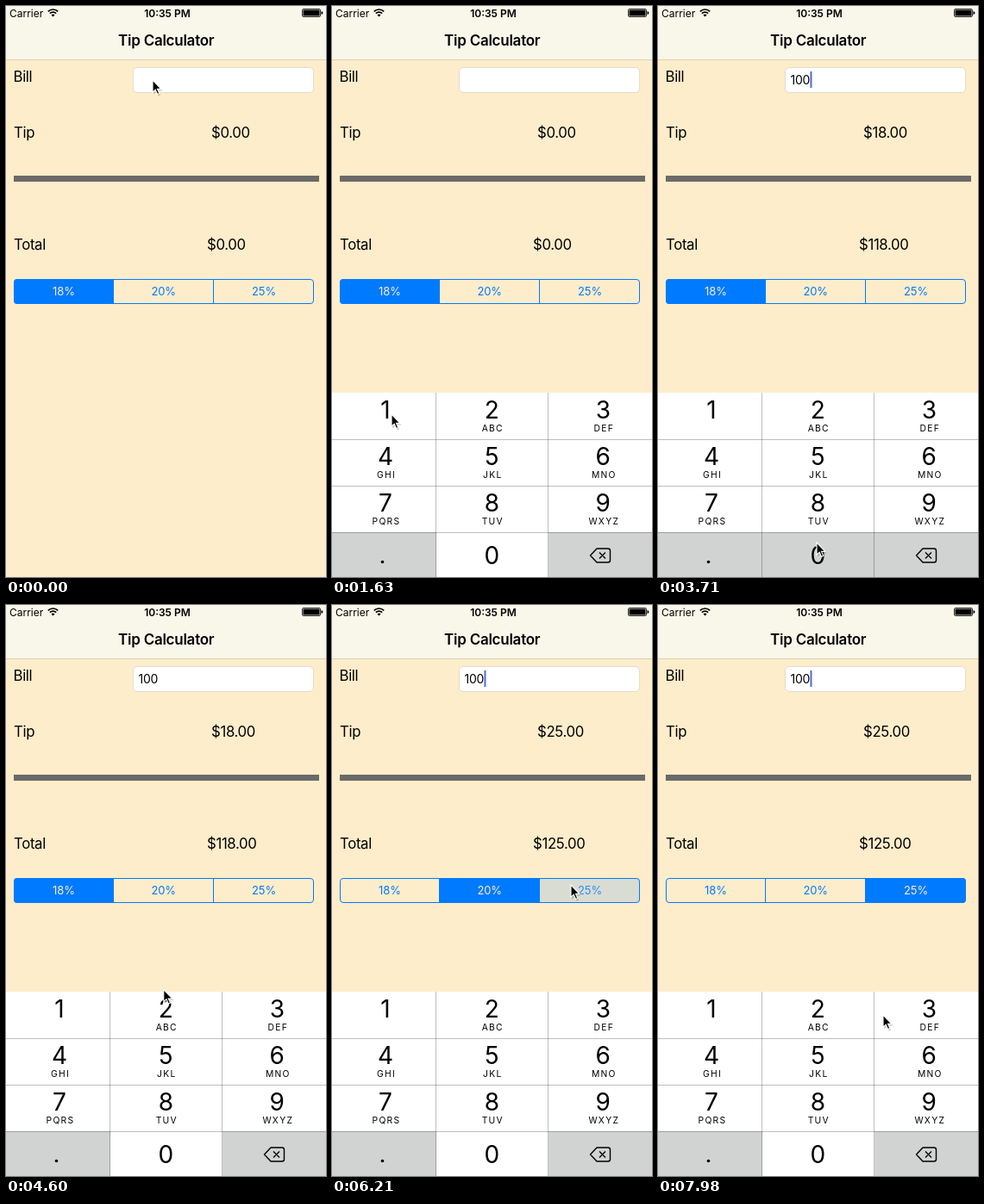
Write an HTML page that moves like this. It is 371 px wide and 663 px high and loops after 8000 ms.

```html
<!DOCTYPE html>
<html lang="en">
<head>
<meta charset="utf-8">
<title>Tip Calculator</title>
<style>
html, body { margin: 0; height: 100%; overflow: hidden; background: #feedcb; }
svg { display: block; width: 371px; height: 663px; font: 16.8px Inter, Roboto, sans-serif; letter-spacing: -.35px; }
.mid { text-anchor: middle; }
.status { font-size: 12px; letter-spacing: 0; }
.bold { font-weight: 600; }
.title { font-size: 17px; letter-spacing: -.25px; }
.seg { font-size: 13px; letter-spacing: -.1px; }
.digit { font-size: 28px; letter-spacing: 0; }
.abc { font-size: 10.3px; letter-spacing: 1.3px; }
#bill { font-size: 14px; letter-spacing: -.3px; }
</style>
</head>
<body>
<svg viewBox="0 0 371 663">
  <rect width="371" height="663" fill="#feedcb"/>
  <rect width="371" height="62" fill="#f9f6ea"/>
  <rect y="62" width="371" height="1" fill="#dccfb1"/>
  <text class="status" x="4" y="12.5">Carrier</text>
  <g fill="none" stroke="#000" stroke-width="1.7">
    <path d="M48.8 6.4a8 8 0 0 1 11.4 0M50.9 8.6a5 5 0 0 1 7.2 0"/>
    <path d="M54.5 12.6l-2-2.1a2.9 2.9 0 0 1 4 0z" fill="#000" stroke="none"/>
  </g>
  <text class="status bold mid" x="187" y="12.5">10:35 PM</text>
  <rect x="343.5" y="3.5" width="21" height="9" rx="1.5" fill="none" stroke="#000" stroke-width=".8"/>
  <rect x="344.5" y="4.5" width="19" height="7" rx=".6"/>
  <path d="M365.5 6q2 .3 2 2t-2 2z"/>
  <text class="title bold mid" x="185.7" y="46">Tip Calculator</text>

  <text x="8.5" y="88">Bill</text>
  <text x="9" y="153">Tip</text>
  <text x="9" y="283">Total</text>
  <rect x="147.5" y="71.5" width="209" height="29" rx="4.5" fill="#fff" stroke="#e3dccb"/>
  <text id="bill" x="153.6" y="91"></text>
  <rect id="caret" y="76" width="2" height="19" fill="#4a6cdc"/>
  <text id="tip" x="238" y="153"></text>
  <text id="total" x="233" y="283"></text>
  <rect x="9" y="197" width="354" height="7" fill="#6b6a68"/>
  <clipPath id="round"><rect x="9" y="317" width="348" height="29" rx="4"/></clipPath>
  <g id="segs" clip-path="url(#round)"></g>
  <path d="M124.5 317v29M240.5 317v29" stroke="#007aff"/>
  <rect x="9.5" y="317.5" width="347" height="28" rx="3.5" fill="none" stroke="#007aff"/>
  <g id="segText"></g>

  <g id="pad"></g>
  <g id="cursor">
    <path d="M1 1.5v15l3.4-3 2.2 5 2.6-1-2.1-5h4.6z" opacity=".2"/>
    <path d="M0 0v14.2l3.2-3 2.3 5.3 2.3-1-2.3-5.1h4.4z" stroke="#fff" stroke-width="1.1"/>
  </g>
</svg>
<script>
const $ = id => document.getElementById(id);
const clamp = v => Math.max(0, Math.min(1, v));
const ramp = (t, from, to) => clamp((t - from) / (to - from));
const ease = k => k * k * (3 - 2 * k);
const mix = (a, b, k) => a + (b - a) * k;

const LOOP = 8000;
// bursts of screen updates: first, last, count
const bursts = [[750, 1780, 8], [1930, 2960, 8], [3110, 3260, 2], [3710, 3860, 2],
  [4150, 5180, 8], [5330, 6360, 8], [6650, 7680, 8], [7830, 7980, 2]];
const ticks = [0, ...bursts.flatMap(([a, b, n]) =>
  Array.from({length: n}, (_, i) => Math.round(mix(a, b, i / (n - 1)) / 10) * 10))];

// pointer stops: time, x, y
const stops = [[0, 170, 86], [950, 170, 86], [1630, 69, 474], [2080, 69, 474],
  [2960, 184, 623], [4000, 184, 623], [5030, 182, 333], [5330, 182, 333],
  [6060, 277, 325], [6500, 277, 325], [7680, 261, 326], [7980, 261, 476], [LOOP, 261, 476]];
const typed = [1930, 3110, 3710];
const rates = [18, 20, 25];

// segmented control
const edges = [9, 124.5, 240.5, 357];
rates.forEach((r, i) => {
  $('segs').innerHTML += `<rect x="${edges[i]}" y="317" width="${edges[i + 1] - edges[i]}" height="29" fill="#007aff"/>`;
  $('segText').innerHTML += `<text class="seg mid" x="${[67, 182.7, 299][i]}" y="336">${r}%</text>`;
});

// number pad
const cols = [0, 121, 251, 371], centers = [62, 185.3, 314.3];
const letters = ['', 'ABC', 'DEF', 'GHI', 'JKL', 'MNO', 'PQRS', 'TUV', 'WXYZ'];
let pad = '';
for (let i = 0; i < 12; i++) {
  const c = i % 3, y = 449 + 54 * (i / 3 | 0), x = centers[c], side = i == 9 || i == 11;
  pad += `<rect x="${cols[c]}" y="${y}" width="${cols[c + 1] - cols[c]}" height="54" fill="${side ? '#d1d3d3' : '#fff'}"/>`;
  if (i < 9) pad += `<text class="digit mid" x="${x}" y="${y + 30}">${i + 1}</text>
    <text class="abc mid" x="${x + 1}" y="${y + 45}">${letters[i]}</text>`;
}
pad += `<text class="digit mid" x="185.3" y="648">0</text><circle cx="58.5" cy="645.5" r="1.8"/>
  <path d="M0 503.5h371M0 557.5h371M0 611.5h371M120.5 449v214M250.5 449v214" stroke="#000" stroke-opacity=".25"/>
  <path d="M307 630h13q2.5 0 2.5 2.5v11q0 2.5-2.5 2.5h-13l-7.5-8zM310 634.5l7 7M317 634.5l-7 7"
    fill="none" stroke="#000" stroke-width="1.4" stroke-linejoin="round"/>`;
$('pad').innerHTML = pad;
const keys = $('pad').querySelectorAll('rect');

function drawPointer(t) {
  const i = Math.max(1, stops.findIndex(s => s[0] > t));
  const [a, x0, y0] = stops[i - 1], [b, x1, y1] = stops[i], k = ease(ramp(t, a, b));
  $('cursor').setAttribute('transform', `translate(${mix(x0, x1, k)} ${mix(y0, y1, k)})`);
}

function drawBill(t) {
  const count = typed.filter(s => s <= t).length;
  const bill = count ? 10 ** (count - 1) : 0;
  const rate = rates[(t >= 5330) + (t >= 6210)];
  $('bill').textContent = bill || '';
  $('tip').textContent = '$' + (bill * rate / 100).toFixed(2);
  $('total').textContent = '$' + (bill * (100 + rate) / 100).toFixed(2);

  const phase = (t - [750, ...typed][count]) % 1000;
  const glow = t < 750 ? 0 : 1 - ramp(phase, 500, 640) + ramp(phase, 900, 1000);
  $('caret').setAttribute('x', 154 + (count && $('bill').getComputedTextLength()));
  $('caret').setAttribute('opacity', glow);
}

function drawSegments(t) {
  const second = ramp(t, 5230, 5380), third = ramp(t, 6210, 6360);
  const chosen = [1 - second, second - third, third];
  const pressed = [0, t >= 5180, t >= 6210];
  chosen.forEach((k, i) => {
    const held = pressed[i] && (i == 2 || t < 5480) ? .15 : 0;
    $('segs').children[i].setAttribute('opacity', mix(held, 1, k));
    const text = $('segText').children[i];
    text.setAttribute('fill', `rgb(${mix(0, 254, k)} ${mix(122, 237, k)} ${mix(255, 203, k)})`);
    text.setAttribute('opacity', held && k < .1 ? .8 : 1);
  });
}

function drawPad(t) {
  const lift = ramp(t, 700, 1159);
  $('pad').setAttribute('transform', `translate(0 ${t < 750 ? 220 : 214 * (1 - lift) ** 2})`);
  const down = start => t >= start && t < start + 150;
  keys[0].setAttribute('fill', down(1930) ? '#d1d3d3' : '#fff');
  keys[10].setAttribute('fill', down(3110) || down(3710) ? '#d1d3d3' : '#fff');
}

function frame() {
  const now = performance.now() % LOOP;
  const t = ticks.findLast(s => s <= now);
  drawPointer(t);
  drawBill(t);
  drawSegments(t);
  drawPad(t);
  requestAnimationFrame(frame);
}
frame();
</script>
</body>
</html>
```
